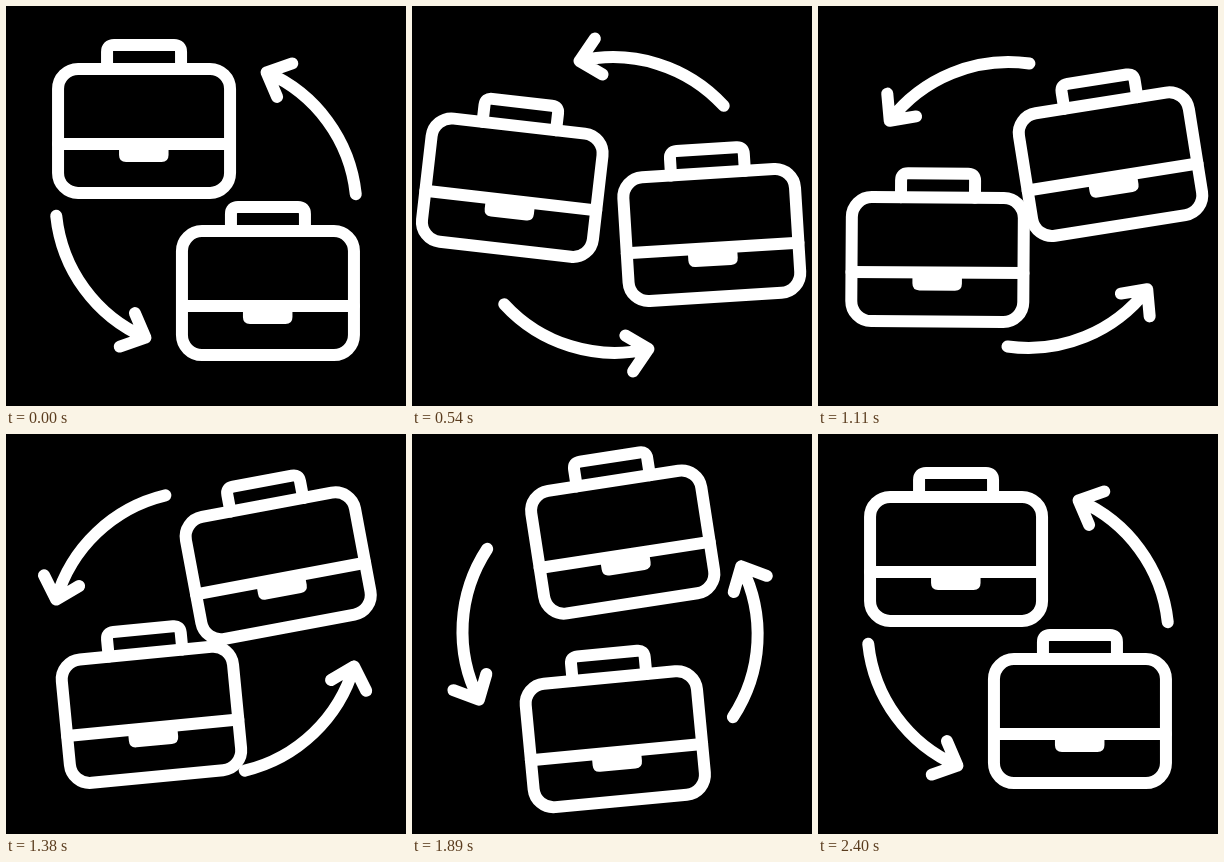
Recreate the animation shown at these times as an HTML page. Size 400 by 400 pixels, loop 2.43 s.

```html
<!DOCTYPE html>
<html lang="en">
<head>
<meta charset="utf-8">
<title>Swapping briefcases</title>
<style>
  html, body { margin: 0; width: 100%; height: 100%; overflow: hidden; background: #000; }
  svg { display: block; width: 100%; height: 100%; }
  .line { fill: none; stroke: #fff; stroke-width: 12; stroke-linecap: round; stroke-linejoin: round; }
</style>
</head>
<body>
<svg viewBox="0 0 400 400">
  <defs>
    <g id="case" class="line">
      <rect x="-86" y="-62" width="172" height="124" rx="20"/>
      <path d="M-37 -62V-79Q-37 -86 -30 -86H30Q37 -86 37 -79V-62M-86 13H86"/>
      <path d="M-25 13H24.500V24Q24.500 31 17.500 31H-18Q-25 31 -25 24Z" fill="#fff" stroke="none"/>
    </g>
    <path id="arrow" class="line" d="M75.500 0A150 150 0 0 0 -75.500 0M-67.500 -26L-75.500 0L-49.500 6"/>
  </defs>
  <use class="case" href="#case"/>
  <use class="case" href="#case"/>
  <use class="arrow" href="#arrow"/>
  <use class="arrow" href="#arrow"/>
</svg>
<script>
  const TURN = 2400, LOOP = 2430, STEP = 30;
  const cases = document.querySelectorAll('.case');
  const arrows = document.querySelectorAll('.arrow');

  const ease = u => (1 - Math.cos(Math.PI * Math.min(1, Math.max(0, u)))) / 2;

  // Eased rise from a to a peak of 1 at b, eased fall to c
  const pulse = (s, a, b, c) => ease(s < b ? (s - a) / (b - a) : (c - s) / (c - b));

  function orbit(cx, cy, r, deg) {
    const a = deg * Math.PI / 180;
    return [cx + r * Math.cos(a), cy - r * Math.sin(a)];
  }

  function place(el, x, y, deg) {
    el.setAttribute('transform', `translate(${x.toFixed(2)} ${y.toFixed(2)}) rotate(${deg.toFixed(2)})`);
  }

  // Sway of the case going down on the left: drift x, drift y, tilt
  const swayDown = s => [
    9.8 * pulse(s, 0.25, 0.57, 1),
    -4.5 * Math.sin(Math.PI * s),
    7.1 * pulse(s, 0, 0.275, 0.67) - 7.5 * pulse(s, 0.275, 0.67, 1)
  ];

  // Sway of the case going up on the right
  function swayUp(s) {
    const swell = Math.sin(Math.PI * s ** 1.5);
    return [10 * pulse(s, 0.2, 0.74, 1), 5 * swell, -10.8 * swell];
  }

  function drawCase(el, s, start, sway) {
    const [x, y] = orbit(200, 206, 102, start + 180 * s);
    const [dx, dy, tilt] = sway(s);
    place(el, x + dx, y + dy, tilt);
  }

  function drawArrow(el, s, start) {
    const angle = start + 180 * s - 2 * pulse(s, 0, 0.22, 0.45);
    const lean = 1.9 - 7.2 * pulse(s, 0.1, 0.46, 0.9);
    const cx = 200 + 2 * Math.sin(2 * Math.PI * s);
    const [x, y] = orbit(cx, 199, 127.3, angle);
    place(el, x, y, 90 - angle - lean);
  }

  function draw(now) {
    const s = Math.floor((now % LOOP) / STEP) * STEP / TURN;
    drawCase(cases[0], s, 127.4, swayDown);
    drawCase(cases[1], s, 307.4, swayUp);
    drawArrow(arrows[0], s, 34.3);
    drawArrow(arrows[1], s, 214.3);
  }

  const start = performance.now();
  function tick() {
    draw(performance.now() - start);
    requestAnimationFrame(tick);
  }
  tick();
</script>
</body>
</html>
```
